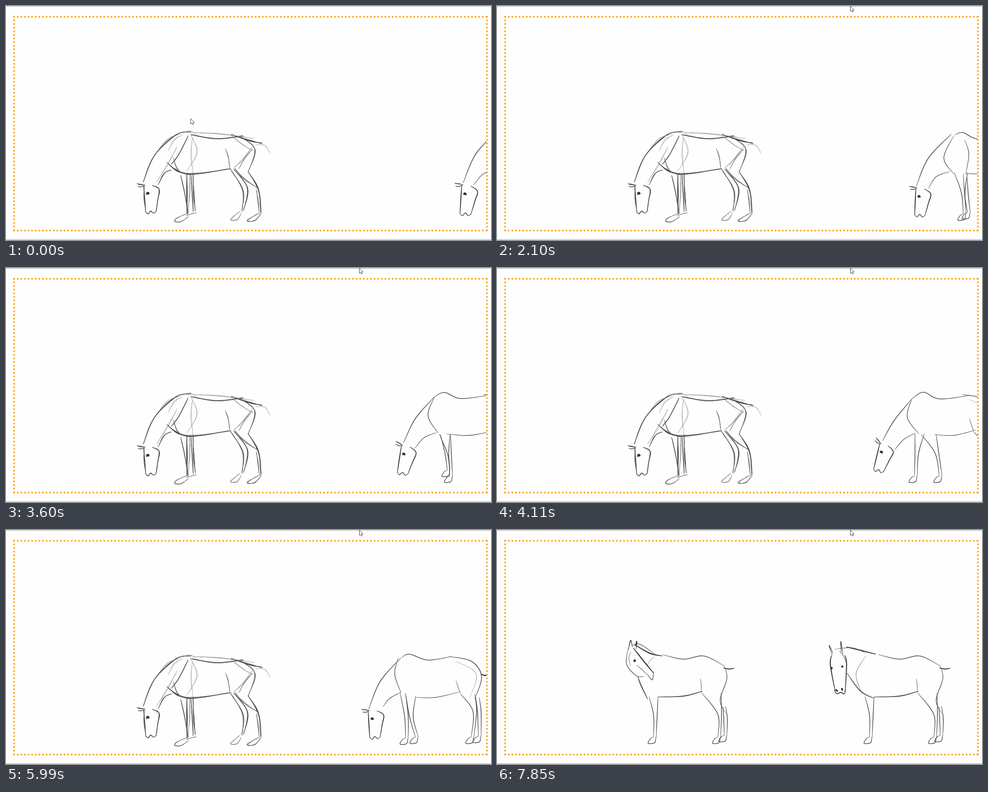
Animation, 1078 px wide and 520 px high, one loop 8 s. Source, as an HTML page with a canvas:

```html
<!DOCTYPE html>
<html lang="en">
<head>
<meta charset="utf-8">
<title>Grazing horses</title>
<style>
  html, body { margin: 0; width: 100%; height: 100%; overflow: hidden; background: #fefefe; }
  .rules { position: absolute; inset: 0; box-sizing: border-box; border: solid #a4a4a4; border-width: 1px 0; }
  .frame { position: absolute; left: 16px; top: 22px; width: 1055px; height: 479px; box-sizing: border-box; border: 4px dotted #ffa110; }
  canvas { position: absolute; left: 0; top: 0; }
</style>
</head>
<body>
<div class="rules"></div>
<div class="frame"></div>
<canvas width="1078" height="520"></canvas>
<script>
const ctx = document.querySelector('canvas').getContext('2d');

// A stroke is a width followed by the points it passes through; strokes are separated by "/".
const parse = text => text.trim().split('/').map(s => s.trim().split(/\s+/).map(Number));
const lerp = (a, b, u) => a + (b - a) * u;
const shift = (strokes, dx) => strokes.map(s => s.map((v, i) => i % 2 ? v + dx : v));

// Head in profile, drawn from the poll.
const ears = parse('1.9 -16 -4 -8 -3 3 -1 / 1.7 -14 2 -6 3 2 0');
const face = parse(`2.1 0 0 -2 30 -4 64 / 2 20 2 35 14 29 36 20 66
  / 1.7 -4 62 1 68 8 62 14 68 20 65 / 5.5 4 21 7 19 10 22`);

function place(strokes, x, y, deg, k) {
  const c = Math.cos(deg * Math.PI / 180) * k, s = Math.sin(deg * Math.PI / 180) * k;
  return strokes.map(([w, ...p]) => [w, ...p.map((v, i) =>
    i % 2 ? y + p[i - 1] * s + v * c : x + v * c - p[i + 1] * s)]);
}
const head = (x, y, deg, k, ear) => [...place(ears, x, y, deg + ear, k), ...place(face, x, y, deg, k)];

// Two outlines from hip to fetlock and a hoof.
const leg = (x, y, w, kx, ky, fx, fy) => [
  [1.6, x, y, kx - 4, ky, fx - 2, fy],
  [1.6, x + w, y, kx + 4, ky, fx + 4, fy - 2],
  [1.6, fx - 2, fy, fx - 9, fy + 4, fx - 14, fy + 14, fx, fy + 13, fx + 3, fy + 3, fx + 4, fy - 2]
];

const reach = {
  head: [907, 398, 0, 1, 0],
  neck: [983, 281, 938, 329, 910, 393],
  throat: [933, 398, 955, 373, 983, 365],
  back: [983, 282, 1001, 277, 1036, 289, 1092, 283],
  shoulder: [983, 281, 964, 325, 984, 366],
  belly: [985, 367, 1045, 372, 1112, 362],
  far: [983, 368, 17, 994, 420, 992, 462],
  near: [1002, 370, 22, 1027, 415, 1036, 460]
};
const lean = {
  head: [851, 390, 10, .93, 32],
  neck: [922, 291, 882, 340, 857, 384],
  throat: [884, 404, 904, 381, 930, 367],
  back: [922, 291, 948, 276, 984, 291, 1052, 283],
  shoulder: [922, 291, 912, 332, 938, 369],
  belly: [972, 370, 1015, 372, 1064, 360],
  far: [943, 370, 33, 978, 412, 985, 462],
  near: [929, 368, 21, 933, 412, 930, 462]
};
const dip = {
  head: [838, 412, -2, .88, 5],
  neck: [920, 288, 862, 348, 837, 408],
  throat: [868, 413, 880, 386, 912, 371],
  back: [918, 287, 936, 282, 970, 297, 1040, 286],
  shoulder: [915, 289, 892, 340, 914, 374],
  blade: [940, 283, 951, 320, 943, 374],
  belly: [944, 373, 985, 373, 1030, 366],
  far: [940, 374, 6, 947, 425, 952, 458],
  near: [912, 370, 31, 931, 415, 932, 462],
  hock: [1032, 366, 8, 1059, 404, 1050, 461],
  heel: [1066, 374, 12, 1080, 415, 1080, 460]
};
const stop = {
  head: [805, 402, -7, .94, 5],
  neck: [878, 284, 832, 336, 806, 398],
  throat: [838, 393, 852, 375, 878, 360],
  back: [880, 283, 897, 276, 938, 289, 990, 281],
  shoulder: [872, 284, 864, 320, 878, 362],
  belly: [910, 372, 955, 372, 1010, 359],
  far: [876, 362, 12, 890, 415, 890, 462],
  near: [889, 368, 22, 901, 415, 912, 460],
  hock: [1010, 364, 32, 1042, 403, 1036, 460],
  heel: [1044, 372, 8, 1052, 405, 1052, 458],
  rump: [985, 281, 1035, 292, 1057, 326, 1042, 375],
  crease: [1000, 334, 1005, 350, 1010, 364],
  haunch: [1000, 292, 1045, 320, 1030, 375],
  tail: [1056, 320, 1063, 323, 1072, 323]
};
for (const part of ['rump', 'crease', 'haunch', 'tail'])
  dip[part] = stop[part].map((v, i) => i % 2 ? v : v + 30);
for (const pose of [reach, lean, stop])
  pose.blade = [0, 1, 2].flatMap(() => pose.near.slice(0, 2));

const widths = { neck: 1.7, throat: 1.4, back: 1.6, shoulder: 1.5, belly: 1.4, blade: 1.4, rump: 1.7, crease: 1.2, haunch: .8, tail: 2.6 };
const limbs = ['far', 'near', 'hock', 'heel'];

// [step, pose, x offset]
const gait = [[0, reach, 106], [8, lean, 107], [13, dip, 107], [19, reach, 0], [27, lean, 0], [32, dip, 0], [39, stop, 0]];
const rear = [[0, stop, 209], [8, stop, 157], [13, dip, 107], [19, stop, 103], [27, stop, 50], [32, dip, 0], [39, stop, 0]];
const nod = [...gait, [15, reach, 10], [34, stop, 5], [38, stop, -5]].sort((a, b) => a[0] - b[0]);
const tracks = [
  [nod, ['head', 'neck', 'throat']],
  [gait, ['back', 'shoulder', 'belly', 'blade', 'far', 'near']],
  [rear, ['hock', 'heel', 'rump', 'crease', 'haunch', 'tail']]
];

function expand(part, v) {
  if (part === 'head') return head(...v);
  return limbs.includes(part) ? leg(...v) : [[widths[part], ...v]];
}

function partAt(keys, part, step) {
  const i = Math.min(keys.length - 2, keys.findLastIndex(k => k[0] <= step));
  const [s0, a, xa] = keys[i], [s1, b, xb] = keys[i + 1];
  const u = (step - s0) / (s1 - s0);
  const v = a[part].map((n, j) => lerp(n, b[part][j], u));
  if (part === 'near' && a === reach) v[6] -= 12 * Math.sin(Math.PI * u);
  return shift(expand(part, v), lerp(xa, xb, u));
}

// Left horse while grazing.
const topline = parse(`2 305 392 330 332 378 286 412 280 / 2.2 410 286 470 295 527 288 / 1 415 281 480 285 552 294
  / 2.3 500 285 540 299 570 305 / .7 555 308 575 310 588 328 / .8 392 282 408 278 425 286 / .9 340 318 360 295 390 284`);
const barrel = parse(`1.7 520 290 553 318 538 370 / 1.4 488 318 494 335 497 360 / 1.2 548 318 530 340 517 362
  / 1 548 312 524 344 506 359 / 1 500 288 526 308 548 321 / 2 372 360 410 374 500 361`);
const chest = parse(`1.8 405 288 385 328 368 352 / .8 412 287 424 325 402 368 / .8 415 292 411 330 416 370
  / 2 358 348 380 366 408 375 / 1.4 372 338 380 360 392 373 / 1.7 338 398 352 372 367 364
  / .9 334 392 360 352 380 312 / .8 360 322 374 298 392 286`);
const forelegs = parse(`1.8 388 376 397 415 405 462 / 2.3 402 372 402 420 403 462 / 1.1 408 374 408 410 405 460
  / 1.9 416 370 417 420 421 456 / 1.8 411 372 414 420 416 458
  / 1.4 404 461 380 471 375 479 390 479 406 467 / 1.2 400 466 412 462 423 459`);
const hindlegs = parse(`1.8 498 362 527 410 524 456 / 2 506 362 537 405 528 454 / 2.3 538 368 561 408 567 459
  / 1.6 508 360 530 385 561 405 / 1.5 557 408 560 435 563 458
  / 1.2 521 456 499 474 514 475 523 460 / 1.5 566 459 536 476 553 477 568 460`);
const grazer = [topline, barrel, chest, forelegs, hindlegs, head(306, 399, -8, .94, 8)].flat();

// Standing horse, used twice, and the heads it can wear.
const trunk = parse(`1.6 848 277 895 287 940 280 985 302 / 1.5 985 302 991 330 976 378 988 407
  / 2.2 983 306 995 309 1008 307 / 1.9 838 371 895 369 937 358 / 1.2 932 330 934 345 934 362`);
const stand = [...trunk, ...leg(818, 370, 20, 832, 412, 830, 460), ...leg(935, 362, 43, 975, 410, 973, 460), ...leg(982, 392, 6, 988, 420, 987, 456)];
const facing = parse(`2.6 776 260 795 264 842 276 / 1.2 750 265 790 262 820 274
  / 1.6 745 278 738 256 747 274 / 1.7 765 272 764 247 769 276
  / 2.2 744 278 741 300 752 360 / 2.2 773 278 777 298 774 360
  / 2 750 356 755 364 764 361 772 364 774 354 / 4 753 354 757 359 / 4 766 351 768 357
  / 5 742 305 745 309 / 5 766 302 769 305 / 1.2 760 268 770 280 777 298
  / 1.9 778 318 808 358 838 374 / 1 820 280 798 320 812 365`);
const turned = parse(`2.5 305 254 340 274 368 280 / 1.4 300 258 318 254 355 279
  / 1.9 292 266 297 245 301 260 / 2 307 258 311 247 309 264 / 1.5 292 262 288 298 310 324 327 325
  / 2.6 303 262 325 290 348 318 / 1.3 310 300 322 310 334 322 / 1.6 348 314 345 333 334 320
  / 6 304 289 308 292 / 1.1 298 270 293 285 297 302 / 2 313 326 320 345 335 376 / .8 352 281 340 290 332 305`);
const raised = {
  head: [757, 283, 29, .95, 25],
  neck: [842, 276, 800, 278, 758, 281],
  throat: [768, 310, 788, 344, 815, 370]
};
const lift = [[40, stop, -57], [41, stop, -57], [43, raised, 0]];

// Fills a smooth line through the points, thinner towards its ends.
function ink([w, ...p]) {
  const n = p.length / 2, path = [];
  const pt = i => { const k = Math.min(n - 1, Math.max(0, i)) * 2; return [p[k], p[k + 1]]; };
  const spline = (a, b, c, d, u) => b + u * (c - a + u * (2 * a - 5 * b + 4 * c - d + u * (3 * (b - c) + d - a))) / 2;
  for (let i = 0; i < n - 1; i++) {
    const [a, b, c, d] = [pt(i - 1), pt(i), pt(i + 1), pt(i + 2)];
    for (let u = 0; u < (i === n - 2 ? 1.01 : .99); u += .125)
      path.push([0, 1].map(k => spline(a[k], b[k], c[k], d[k], u)));
  }
  const last = path.length - 1;
  const edge = path.map(([x, y], i) => {
    const a = path[Math.max(0, i - 1)], b = path[Math.min(last, i + 1)];
    const dx = b[0] - a[0], dy = b[1] - a[1], len = Math.hypot(dx, dy) || 1;
    const h = w / 2 * (.5 + .5 * Math.sin(Math.PI * i / last));
    return [x, y, -dy / len * h, dx / len * h];
  });
  const g = Math.max(52, 165 - 55 * w);
  ctx.fillStyle = `rgb(${g},${g},${g})`;
  ctx.beginPath();
  edge.forEach(([x, y, nx, ny]) => ctx.lineTo(x + nx, y + ny));
  edge.reverse().forEach(([x, y, nx, ny]) => ctx.lineTo(x - nx, y - ny));
  ctx.fill();
}
const draw = (strokes, dx = 0) => shift(strokes, dx).forEach(ink);

// A lighter second pass beside each line gives the rough pencil look.
const echo = strokes => strokes.map(([w, ...p], k) =>
  [w * .5, ...p.map((v, i) => v + 2.2 * Math.sin(k * 7 + i * 5))]);
const rough = [...grazer, ...echo(grazer)];

const arrow = new Path2D('M.5 .5V12L3.2 9.6 5 13.6 7 12.7 5.3 8.8H8.8Z');
function cursor(step) {
  const u = Math.min(1, step / 6);
  ctx.save();
  ctx.translate(lerp(410, 785, u), lerp(250, 0, u));
  ctx.fillStyle = '#fff';
  ctx.strokeStyle = '#444';
  ctx.fill(arrow);
  ctx.stroke(arrow);
  ctx.restore();
}

// [first change, last change, number of changes]
const spans = [[120, 1000, 7], [1250, 2220, 8], [2340, 2900, 4], [3200, 4110, 8], [4250, 5200, 7], [5320, 5710, 4],
  [5990, 6270, 2], [6570, 7070, 3], [7350, 7850, 3]];
const stepAt = t => spans.reduce((sum, [a, b, n]) =>
  sum + Math.max(0, Math.min(n, Math.floor((t - a) * (n - 1) / (b - a) + 1e-6) + 1)), 0);

function paint(step) {
  ctx.clearRect(0, 0, 1078, 520);
  ctx.save();
  ctx.beginPath();
  ctx.rect(0, 0, 1068, 520);
  ctx.clip();
  if (step < 40) {
    draw(rough);
    for (const [keys, parts] of tracks) parts.forEach(part => draw(partAt(keys, part, step)));
  } else {
    const look = step < 44 ? tracks[0][1].flatMap(part => partAt(lift, part, step)) : facing;
    draw([...stand, ...look]);
    draw(stand, -480);
    if (step === 46) draw(turned);
    else draw(look, -480);
  }
  ctx.restore();
  cursor(step);
}

const start = performance.now();
let shown = -1;
function tick() {
  const step = stepAt((performance.now() - start) % 8000);
  if (step !== shown) paint(shown = step);
  requestAnimationFrame(tick);
}
tick();
</script>
</body>
</html>
```
